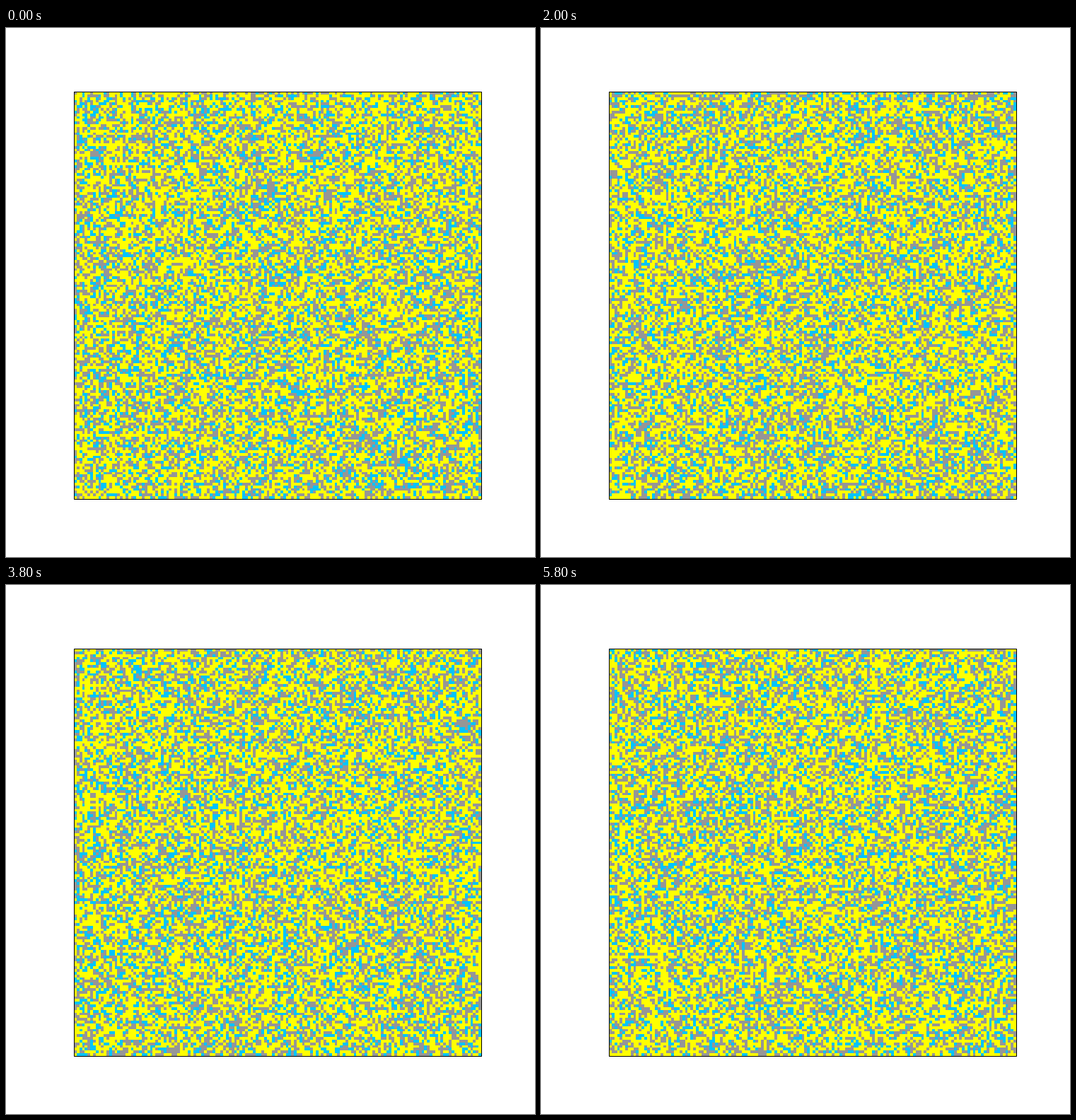
Write a matplotlib script that moves like this. It is 748x748 px and loops after 6 s.

```python
import numpy as np
import matplotlib.pyplot as plt
from matplotlib.animation import FuncAnimation
from matplotlib.colors import ListedColormap
from matplotlib.patches import Rectangle

SIZE, DPI = 748, 100
LEFT, TOP, SIDE = 96, 90, 576
CELLS = 150
FRAMES, STEP = 30, 200
COLORS = ["#ffff00", "#969696", "#00c4ff"]
SHARES = [0.5, 0.32, 0.18]


def cells(frame):
    """Fresh random cell states; the opening state is held for two steps."""
    rng = np.random.default_rng(1000 + max(frame, 1))
    return rng.choice(len(COLORS), size=(CELLS, CELLS), p=SHARES)


fig = plt.figure(figsize=(SIZE / DPI, SIZE / DPI), dpi=DPI, facecolor="white")
ax = fig.add_axes([0, 0, 1, 1])
ax.axis("off")

grid = ax.imshow(cells(0), cmap=ListedColormap(COLORS), vmin=0,
                 vmax=len(COLORS) - 1, interpolation="nearest",
                 extent=(LEFT, LEFT + SIDE, TOP + SIDE, TOP), aspect="auto")
ax.set_xlim(0, SIZE)
ax.set_ylim(SIZE, 0)

# Pixel centres without snapping keep the border exactly one pixel wide.
ax.add_patch(Rectangle((LEFT + 0.5, TOP + 0.5), SIDE, SIDE, fill=False,
                       edgecolor="black", linewidth=72 / DPI, snap=False,
                       joinstyle="miter", zorder=3))


def update(frame):
    grid.set_data(cells(frame))
    return [grid]


anim = FuncAnimation(fig, update, frames=FRAMES, interval=STEP,
                     repeat=True, repeat_delay=0, blit=False)
plt.show()
```
